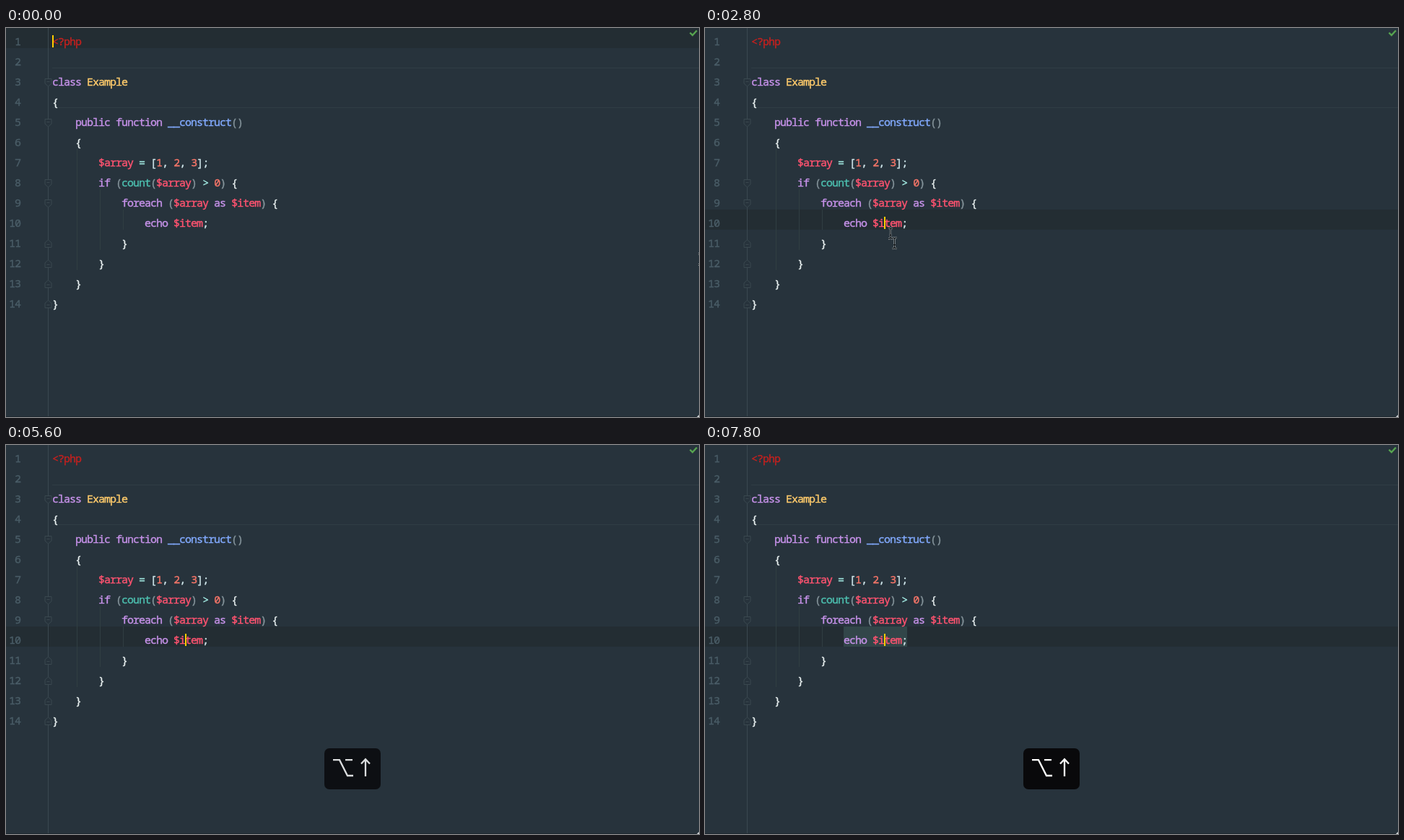
An HTML page that plays this animation: 960 px wide and 540 px high, repeating every 8000 ms.

```html
<!DOCTYPE html>
<html lang="en">
<head>
<meta charset="utf-8">
<title>Extend selection</title>
<style>
  html, body { margin: 0; width: 100%; height: 100%; overflow: hidden; background: #27333c; }
  svg { display: block; }
  text { font: 15px "Noto Sans Mono", monospace; letter-spacing: -1px; white-space: pre; stroke-width: 0.4; }
  .line { fill: none; stroke-width: 1; }
  .pointer { fill: none; }
</style>
</head>
<body>
<svg id="stage" width="960" height="540" viewBox="0 0 960 540">
  <defs>
    <path id="fold" d="M-4.5 -5H4.5V1.5L0 5.5L-4.5 1.5ZM-2 -1H2"/>
    <path id="beam" d="M-3 -7.5Q0 -7.5 0 -5.5Q0 -7.5 3 -7.5M0 -5.5V5.5Q0 7.5 -3 7.5M0 5.5Q0 7.5 3 7.5M-1.5 2.5H1.5"/>
  </defs>
  <rect width="960" height="540" fill="#27333c"/>
  <rect id="row" width="960" height="28" fill="#232d33"/>
  <path class="line" stroke="#303d45" d="M64 55.5H960M64 110.5H960"/>
  <path class="line" stroke="#3a4850" d="M58.5 0V540"/>
  <path class="line" stroke="#303e42" d="M98.5 168V336M130.5 224V308M162.5 252V280"/>
  <rect id="selection" y="252" height="28" fill="#324649"/>
  <g id="folds" fill="#27333c" stroke="#3d4b52" stroke-width="0.9"></g>
  <g id="code"></g>
  <rect id="caret" width="2" height="17" fill="#ffcc00"/>
  <path d="M947.5 6.5L951 10L957 3.5" fill="none" stroke="#57a550" stroke-width="2.4"/>
  <path class="line" stroke="#1e282f" d="M0 539.5H960"/>
  <path d="M960 537V540H957Z" fill="#d5dadc"/>
  <g id="badge">
    <rect x="441" y="421" width="78" height="57" rx="7" fill="#09090b"/>
    <path d="M453 437.2H462L473 459H481M470 437.2H480M498 460V436.5M492 442.5L498 436.2L504 442.5"
      fill="none" stroke="#fff" stroke-width="2.3"/>
  </g>
  <g id="pointers"></g>
</svg>
<script>
const $ = id => document.getElementById(id);
const ROW = 28, LEFT = 64;

function add(parent, name, attrs, content = '') {
  const node = document.createElementNS('http://www.w3.org/2000/svg', name);
  set(node, attrs);
  node.textContent = content;
  return parent.appendChild(node);
}
function set(node, attrs) {
  for (const key in attrs) node.setAttribute(key, attrs[key]);
}

const source = `<?php

class Example
{
    public function __construct()
    {
        $array = [1, 2, 3];
        if (count($array) > 0) {
            foreach ($array as $item) {
                echo $item;
            }
        }
    }
}`;

// Each rule is tried in turn; the last one catches plain text.
const rules = [
  [/^<\?php/, '#c3211f'],
  [/^\$\w+/, '#ff5370'],
  [/^(class|public|function|if|foreach|as|echo)\b/, '#c792ea'],
  [/^Example/, '#ffcb6b'],
  [/^__construct/, '#82aaff'],
  [/^count/, '#4dc0b0'],
  [/^\d/, '#f77669'],
  [/^[()]/, '#84939a'],
  [/^[=>]/, '#a3ebe3'],
  [/^[\[\],;]/, '#cfe6ea'],
  [/^(\s+|.)/, '#e8f0f0']
];
const ink = color => ({ fill: color, stroke: color });

source.split('\n').forEach((line, i) => {
  const y = i * ROW + 24;
  add($('code'), 'text', { x: 20, y, 'text-anchor': 'end', ...ink('#4a5d67') }, i + 1);
  const text = add($('code'), 'text', { x: LEFT, y });
  while (line) {
    const [pattern, color] = rules.find(rule => rule[0].test(line));
    const token = line.match(pattern)[0];
    add(text, 'tspan', ink(color), token);
    line = line.slice(token.length);
  }
});

for (const n of [3, 5, 8, 9, 11, 12, 13, 14]) {
  const flip = n > 10 ? -1 : 1;
  add($('folds'), 'use', { href: '#fold', transform: `translate(58.5 ${n * ROW - 8.5}) scale(1 ${flip})` });
}

// Two pointer images: the current one and a trailing one.
const pointers = [0, 50].map(lag => {
  const group = add($('pointers'), 'g', { class: 'pointer' });
  add(group, 'use', { href: '#beam', stroke: '#c4cbce', 'stroke-width': 2.3 });
  add(group, 'use', { href: '#beam', stroke: '#0c1114', 'stroke-width': 1.3 });
  return { group, lag };
});

// time, x, y
const path = [
  [0, 962, 321], [300, 850, 338], [500, 690, 343], [700, 515, 337], [750, 458.5, 321.5], [800, 401.5, 300.5],
  [1000, 398, 297], [1150, 398, 297], [1450, 315, 284], [1750, 251.5, 271.5],
  [2700, 251.5, 271.5], [2850, 268, 312], [3050, 340, 460], [3200, 372, 555]
];
function pointerAt(t) {
  const next = path.findIndex(p => p[0] > t);
  if (next < 1) return path[next < 0 ? path.length - 1 : 0].slice(1);
  const a = path[next - 1], b = path[next], k = (t - a[0]) / (b[0] - a[0]);
  return [a[1] + (b[1] - a[1]) * k, a[2] + (b[2] - a[2]) * k];
}

const clamp = v => Math.max(0, Math.min(1, v));
const fadeIn = (t, start) => clamp((t - start + 100) / 360);
function badgeOpacity(t) {
  if (t < 5400) return 0;
  if (t < 6200) return fadeIn(t, 5400);
  if (t < 7400) return 0.28 * clamp(1 - (t - 6200) / 400);
  return fadeIn(t, 7400);
}

function caretVisible(t) {
  if (t < 2200) return t % 1000 < 500;
  return t < 2900 || t >= 6000 || (t - 400) % 1000 < 500;
}

function render(t) {
  const clicked = t >= 2200;
  set($('row'), { y: clicked ? 9 * ROW : 0 });
  set($('caret'), {
    x: clicked ? 248 : LEFT,
    y: clicked ? 262 : 10,
    opacity: +caretVisible(t)
  });
  const [from, to] = t >= 7700 ? [192, 280] : t >= 5700 ? [240, 272] : [0, 0];
  set($('selection'), { x: from, width: to - from });
  set($('badge'), { opacity: badgeOpacity(t) });
  for (const { group, lag } of pointers) {
    set(group, { transform: `translate(${pointerAt(t - lag)})` });
  }
}

function tick() {
  render(Math.floor(performance.now() % 8000 / 100) * 100);
  requestAnimationFrame(tick);
}
tick();
</script>
</body>
</html>
```
